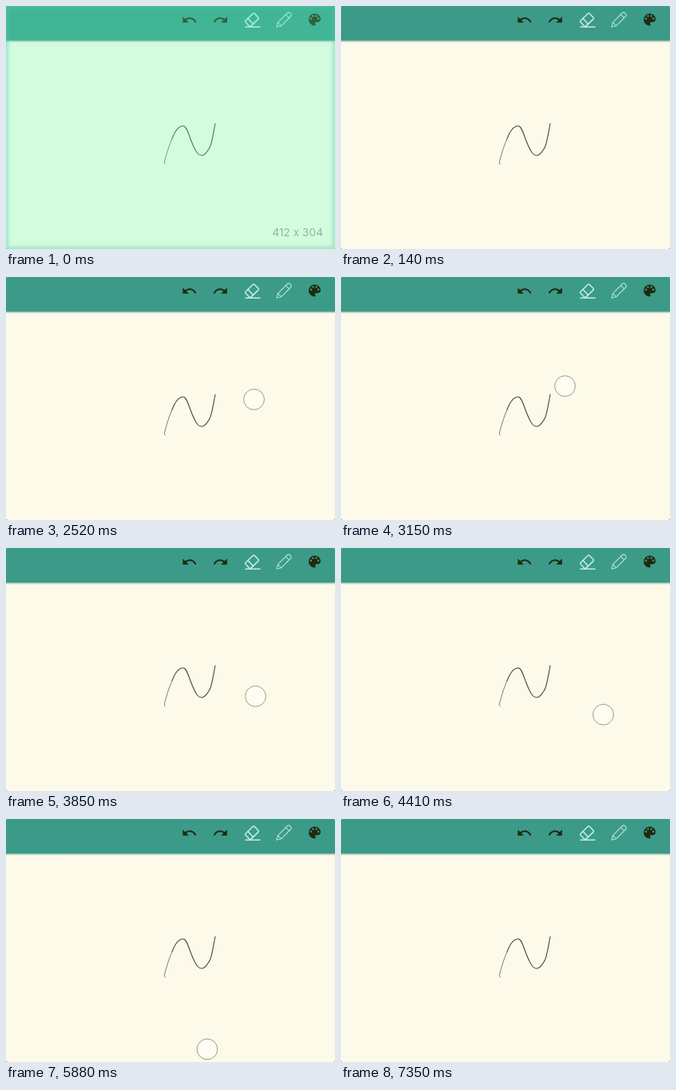
An HTML page for the animation above (7420 ms loop, 412 px wide and 304 px high).

```html
<!DOCTYPE html>
<html lang="en">
<head>
<meta charset="utf-8">
<title>Drawing canvas eraser</title>
<style>
html, body { margin: 0; width: 100%; height: 100%; overflow: hidden; background: #6b7a72; }
svg { display: block; width: 412px; height: 304px; border-radius: 2px; }
.line { fill: none; stroke-linecap: round; stroke-linejoin: round; }
.dark { fill: #202a0f; }
.pale { stroke: #c6eee2; }
.ink { stroke: #4a473e; }
.glow { fill: none; stroke: #50c8a0; stroke-width: 6; opacity: .4; filter: blur(2px); }
text { font: 13.7px Inter, Roboto, sans-serif; fill: #93b5a0; text-anchor: end; }
</style>
</head>
<body>
<svg viewBox="0 0 412 304">
  <defs>
    <linearGradient id="shade" x2="0" y2="1">
      <stop stop-color="#7fa99a" stop-opacity=".6"/>
      <stop offset="1" stop-color="#7fa99a" stop-opacity="0"/>
    </linearGradient>
    <path id="arrow" d="M12.5 8c-2.6 0-5 1-6.900 2.600L2 7v9h9l-3.600-3.600c1.400-1.200 3.100-1.900 5.100-1.900 3.500 0 6.600 2.300 7.600 5.500l2.400-.8C21 11 17 8 12.500 8z"/>
  </defs>
  <rect width="412" height="304" fill="#fefaea"/>
  <rect width="412" height="43.600" fill="#3b9b88"/>
  <rect y="43.600" width="412" height="2.400" fill="url(#shade)"/>

  <g class="dark">
    <use href="#arrow" transform="translate(219.700 7.500) scale(.833)"/>
    <use href="#arrow" transform="translate(278.500 7.500) scale(-.833 .833)"/>
    <g transform="translate(376.500 7) scale(.833)">
      <path d="M12 3a9 9 0 0 0 0 18c1.500 0 2-1.500 1-2.500-.8-1-.2-2.500 1-2.500h2c3 0 5-2 5-5 0-4-4-8-9-8z"/>
      <path class="line" stroke="#3b9b88" stroke-width="3" d="M6.500 10.500h.01M9.500 6.500h.01M14.500 6.500h.01M17.500 10.500h.01"/>
    </g>
  </g>

  <g class="line pale">
    <g stroke-width="1.500" transform="translate(308 17.300) rotate(-44)">
      <rect x="-7.800" y="-4.800" width="15.600" height="9.600" rx="1.500"/>
      <path d="M-2.500 -4.800v9.600"/>
    </g>
    <path stroke-width="1.500" d="M300 26.200h18"/>
    <path stroke-width="1.100" opacity=".85" transform="translate(347.500 17.700) rotate(-45)"
      d="M-12 0L-7 -3H10Q12 -3 12 -1V1Q12 3 10 3H-7ZM7 -3V3M-7 -3V3"/>
  </g>

  <g class="line ink">
    <path stroke-width=".7" d="M199.300 198Q197.800 196.500 198.500 194.500C201 185 204 175 208 166"/>
    <path stroke-width="1.100" d="M208 166C211 158 216 150 222 150C227 150 229 164 236 178C239 184 241 187 245 187C249 187 254 180 256 175C258.500 168 260 157 262 147"/>
  </g>

  <circle id="dot" cx="277.500" cy="149.500" r="2.500" fill="#efeadd"/>
  <circle id="ring" r="12.900" fill="#fffdf1" stroke="#9c968a"/>

  <g id="veil">
    <rect width="412" height="304" fill="#55ffbe" fill-opacity=".26"/>
    <rect class="glow" width="412" height="304"/>
    <text x="397" y="288">412 x 304</text>
  </g>
</svg>
<script>
const LOOP = 7420, STEP = 70;
const [dot, ring, veil] = ['dot', 'ring', 'veil'].map(id => document.getElementById(id));

// Turning points of the eraser: time, x, y
const path = [
  [2030, 303, 150], [2310, 316, 150], [2730, 301, 154], [3150, 280.5, 136.5],
  [3850, 312.5, 185.5], [4130, 320, 221], [4760, 336, 180], [5040, 326, 155],
  [5880, 252, 288], [6440, 337, 222], [6790, 328, 230]
];

function slope(i, k) {
  const a = path[Math.max(i - 1, 0)], b = path[Math.min(i + 1, path.length - 1)];
  return (b[k] - a[k]) / (b[0] - a[0]);
}

// Cubic Hermite curve through the timed points
function at(t, k) {
  const i = Math.max(0, path.findIndex(p => p[0] >= t) - 1);
  const a = path[i], b = path[i + 1], span = b[0] - a[0];
  const u = (t - a[0]) / span, v = 1 - u;
  return a[k] * v * v * (1 + 2 * u) + b[k] * u * u * (3 - 2 * u)
    + span * u * v * (slope(i, k) * v - slope(i + 1, k) * u);
}

const show = (el, amount) => el.setAttribute('opacity', +amount);

function draw(now) {
  const t = Math.floor(now % LOOP / STEP) * STEP;
  const active = t >= 2030 && t < 6790;
  show(veil, Math.max(0, 1 - t / 140));
  show(dot, t >= 1540 && t < 1820);
  show(ring, active);
  if (active) {
    ring.setAttribute('cx', at(t, 1));
    ring.setAttribute('cy', at(t, 2));
  }
}

const start = performance.now();
function frame() {
  draw(performance.now() - start);
  requestAnimationFrame(frame);
}
frame();
</script>
</body>
</html>
```
